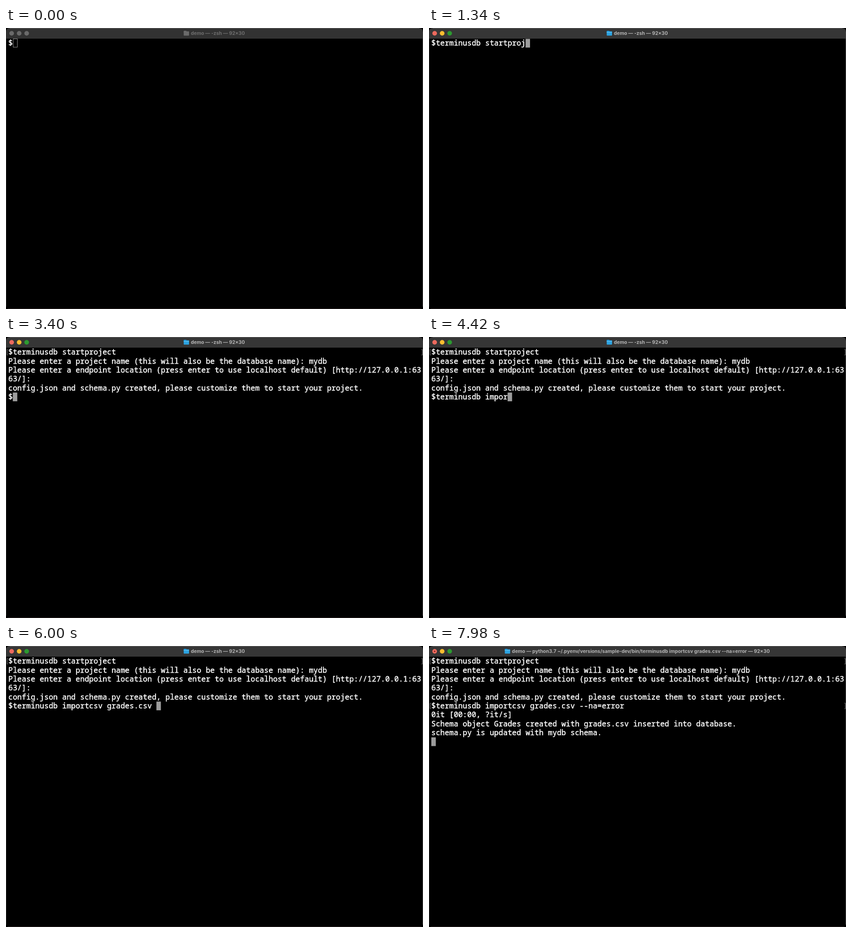
Recreate the animation shown at these times as an HTML page with a canvas. Size 900 by 608 pixels, loop 8000 ms.

```html
<!DOCTYPE html>
<html lang="en">
<head>
<meta charset="utf-8">
<title>Terminal</title>
<style>
  html, body { margin: 0; height: 100%; overflow: hidden; background: #000; }
  canvas { display: block; }
</style>
</head>
<body>
<canvas id="stage" width="900" height="608"></canvas>
<script>
const ctx = document.getElementById("stage").getContext("2d");
const LOOP = 8000, COLS = 92, CELL = 9.685, LINE = 19.35, LEFT = 5, TOP = 23;
const FOCUS = 20;

// Each entry adds one piece of text to the screen at a given time.
const script = [];
const print = (time, text) => script.push({ time, text });
const type = (start, end, text) => [...text].forEach((char, i) =>
  print(start + (end - start) * i / Math.max(1, text.length - 1), char));

print(0, "$");
type(360, 760, "terminusdb");
type(840, 1040, " star");
type(1180, 1330, "tproj");
type(1400, 1540, "ect");
print(1700, "\n");
print(2060, "Please enter a project name (this will also be the database name): ");
type(2240, 2500, "mydb");
print(2860, "\nPlease enter a endpoint location (press enter to use localhost default) [http://127.0.0.1:6363/]: ");
print(3400, "\nconfig.json and schema.py created, please customize them to start your project.\n$");
type(3440, 3900, "terminusdb");
print(4080, " ");
type(4240, 4410, "impor");
type(4500, 4680, "tcsv");
type(4800, 5500, " grades.csv");
print(5720, " ");
type(6040, 6540, "--na=error");
print(6800, "\n");
print(7520, "0it [00:00, ?it/s]\n");
print(7680, "Schema object Grades created with grades.csv inserted into database.\n");
print(7800, "schema.py is updated with mydb schema.\n");

const python = args =>
  `demo — python3.7 ~/.pyenv/versions/sample-dev/bin/terminusdb ${args} — 92×30`;
const titles = [
  [0, "demo — -zsh — 92×30"],
  [2260, python("startproject")],
  [3400, "demo — -zsh — 92×30"],
  [7000, python("importcsv grades.csv --na=error")],
];
const marks = [[1700, 0], [6800, 5]];

function screenRows(t) {
  const text = script.filter(s => s.time <= t).map(s => s.text).join("");
  return text.split("\n").flatMap(line => {
    const rows = [];
    do {
      rows.push(line.slice(0, COLS));
      line = line.slice(COLS);
    } while (line);
    return rows;
  });
}

function dot(x, y, radius, color) {
  ctx.fillStyle = color;
  ctx.beginPath();
  ctx.arc(x, y, radius, 0, 7);
  ctx.fill();
}

function box(x, y, w, h, radius, color) {
  ctx.fillStyle = color;
  ctx.beginPath();
  ctx.roundRect(x, y, w, h, radius);
  ctx.fill();
}

function drawFolder(x, active) {
  box(x, 6, 6, 4, 1, active ? "#1689c9" : "#6a6a6a");
  box(x, 7.2, 11.5, 9.3, 1, active ? "#2ba3e2" : "#6a6a6a");
  if (active) box(x, 9, 11.5, 1, 0, "#6cc5f2");
}

function drawTitleBar(t) {
  const active = t >= FOCUS;
  box(0, 0, 900, 23, [8, 8, 0, 0], active ? "#363636" : "#323232");
  box(8, 0, 884, 1, 0, "#626262");

  const lights = ["#ed6a5e", "#fabd2f", "#2c9a30"];
  lights.forEach((color, i) => dot(12.2 + 16.2 * i, 11.5, 5, active ? color : "#6a6a6a"));

  const [start, title] = titles.filter(([time]) => time <= t).pop();
  if (title.includes("python")) dot(12.2, 11.5, 1.5, "#7d1f18");

  ctx.font = "bold 10.4px Inter, sans-serif";
  const left = 449.5 - (ctx.measureText(title).width + 15.5) / 2;
  drawFolder(left, active);
  ctx.fillStyle = active ? "#b4b4b4" : "#6e6e6e";
  ctx.fillText(title, left + 15.5, 14.8);
}

function drawMark(row) {
  const y = TOP + row * LINE + 4;
  ctx.strokeStyle = "#777";
  ctx.lineWidth = 1;
  ctx.beginPath();
  for (const [edge, inner] of [[2.5, 4.5], [898.5, 896.5]]) {
    ctx.moveTo(inner, y);
    ctx.lineTo(edge, y);
    ctx.lineTo(edge, y + 12);
    ctx.lineTo(inner, y + 12);
  }
  ctx.stroke();
}

function drawText(t) {
  const rows = screenRows(t);
  const last = rows.length - 1;
  const x = LEFT + rows[last].length * CELL, y = TOP + last * LINE;
  if (t >= FOCUS) {
    box(x, y + 0.5, CELL, LINE - 0.5, 0, "#9c9c9c");
  } else {
    ctx.strokeStyle = "#8c8c8c";
    ctx.lineWidth = 1;
    ctx.strokeRect(15.5, 23.5, 9, 18);
  }

  ctx.font = "16.14px 'Noto Sans Mono', monospace";
  ctx.fillStyle = ctx.strokeStyle = "#fff";
  ctx.lineWidth = 0.45;
  rows.forEach((row, r) => [...row].forEach((char, c) => {
    const at = [char, LEFT + c * CELL, TOP + r * LINE + 15.2];
    ctx.fillText(...at);
    ctx.strokeText(...at);
  }));
}

function draw(now) {
  const t = now % LOOP;
  ctx.fillStyle = "#000";
  ctx.fillRect(0, 0, 900, 608);
  drawTitleBar(t);
  box(0, 23, 1, 580, 0, "#2c2c2c");
  box(899, 8, 1, 595, 0, "#4a4a4a");
  box(4, 607, 892, 1, 0, "#2e2525");
  marks.filter(([time]) => time <= t).forEach(([, row]) => drawMark(row));
  drawText(t);
}

const begin = performance.now();
function frame() {
  draw(performance.now() - begin);
  requestAnimationFrame(frame);
}
frame();
</script>
</body>
</html>
```
